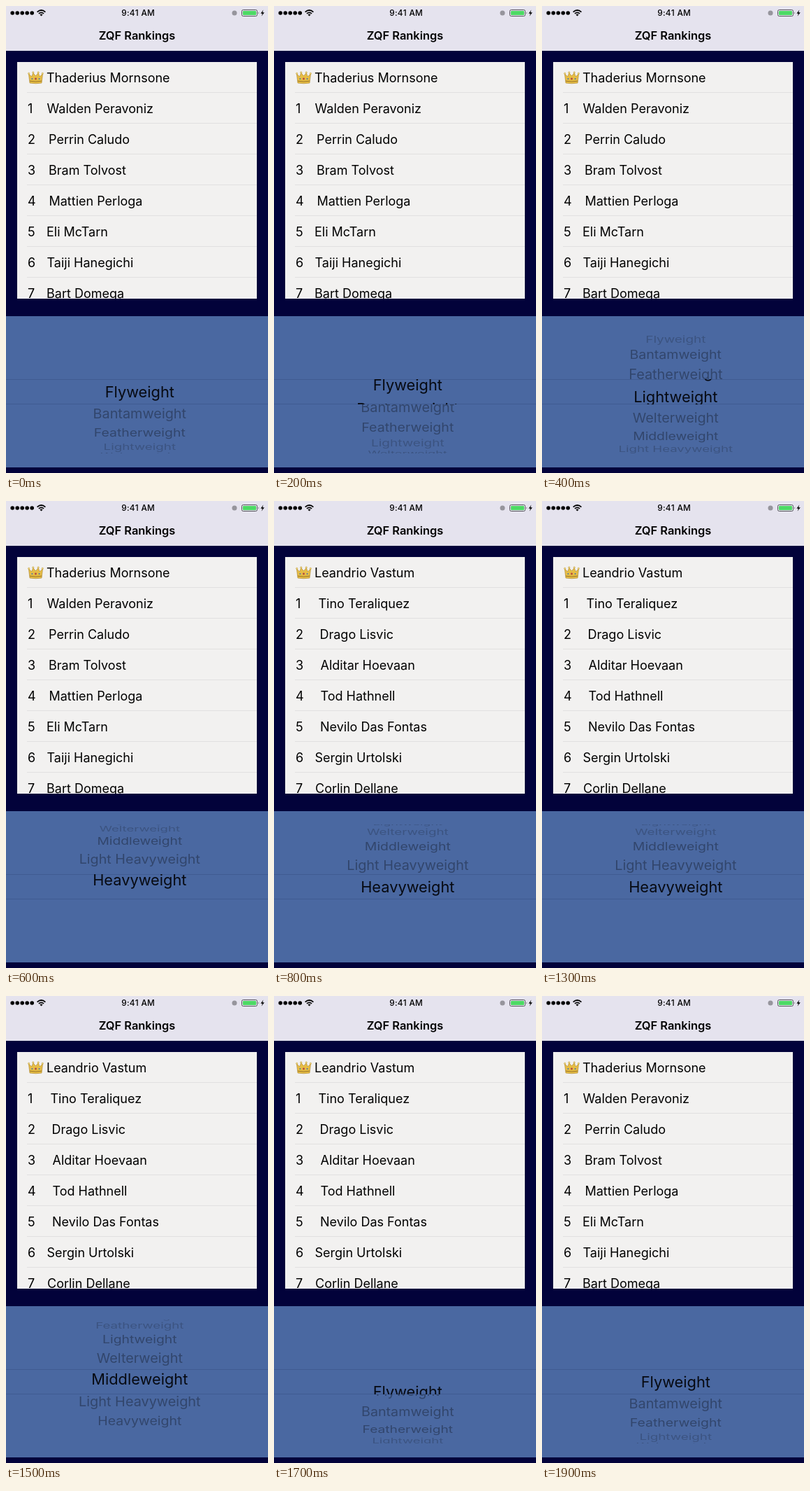
Animation, 375 px wide and 667 px high, one loop 2 s. Source, as an HTML page:

```html
<!DOCTYPE html>
<html lang="en">
<head>
<meta charset="utf-8">
<title>Rankings</title>
<style>
  html, body { margin: 0; width: 100%; height: 100%; overflow: hidden; background: #02023a; }
  svg { display: block; width: 375px; height: 667px; font-family: Inter, "Liberation Sans", sans-serif; }
  .title { font-size: 16.4px; font-weight: 600; }
  .time { font-size: 11.8px; font-weight: 500; letter-spacing: .35px; }
  .list { font-size: 18px; }
  .wheel { text-anchor: middle; }
  .outer { font-size: 20px; }
  .band { font-size: 21.8px; fill: #070a12; }
</style>
</head>
<body>
<svg viewBox="0 0 375 667">
  <defs>
    <clipPath id="panelClip"><path d="M16 80H359V418H16z"/></clipPath>
    <clipPath id="outerClip"><path d="M0 462H375V533H0zM0 569H375V639H0z"/></clipPath>
    <clipPath id="bandClip"><path d="M0 533H375V569H0z"/></clipPath>
  </defs>
  <rect width="375" height="667" fill="#02023a"/>

  <rect width="375" height="64" fill="#e5e3ee"/>
  <g id="signal"></g>
  <g fill="none" stroke="#000" stroke-width="1.7">
    <path d="M44.6 8.6Q50.5 3.4 56.4 8.6M46.9 10.9Q50.5 7.8 54.1 10.9"/>
    <path d="M48.4 12.3Q50.5 10.6 52.6 12.3L50.5 14.5z" fill="#000" stroke="none"/>
  </g>
  <text class="time" x="189.2" y="14.4" text-anchor="middle">9:41 AM</text>
  <circle cx="327" cy="10" r="3.5" fill="#96959c"/>
  <rect x="337.5" y="5.5" width="22" height="9" rx="2" fill="none" stroke="#55545a"/>
  <rect x="339" y="7" width="19" height="6" rx=".8" fill="#4cd964"/>
  <path d="M361 8.3q1.6 1.7 0 3.4z" fill="#55545a"/>
  <path d="M368.3 5.5L364.5 10.7H367L365.7 14.6L369.8 9.2H367.2z"/>
  <text class="title" x="187.5" y="48" text-anchor="middle">ZQF Rankings</text>

  <rect x="16" y="80" width="343" height="338" fill="#f2f1f0"/>
  <g clip-path="url(#panelClip)">
    <g id="rules" stroke="#e1e0e0"></g>
    <g>
      <path d="M34 110L32.4 96.5L36.6 101L38.8 95.5L42.5 100L46.2 95.5L48.4 101L52.6 96.5L51 110Q42.5 111.5 34 110z" fill="#e6bd45" stroke="#a8812c" stroke-width=".6"/>
      <path d="M34 107.2Q42.5 108.8 51 107.2" fill="none" stroke="#8f6a22" stroke-width=".9"/>
      <g fill="#f5dc7c" stroke="#a8812c" stroke-width=".4">
        <circle cx="32.7" cy="96.4" r="1.2"/><circle cx="38.8" cy="95" r="1.2"/>
        <circle cx="46.2" cy="95" r="1.2"/><circle cx="52.3" cy="96.4" r="1.2"/>
      </g>
      <circle cx="42.5" cy="104" r="1.4" fill="#b5443c"/>
      <circle cx="37.4" cy="104" r="1.1" fill="#4f79a8"/><circle cx="47.6" cy="104" r="1.1" fill="#4f79a8"/>
    </g>
    <g id="ranks" class="list"></g>
    <g id="flyList" class="list"></g>
    <g id="heavyList" class="list"></g>
  </g>

  <rect y="443" width="375" height="216" fill="#4a68a1"/>
  <path d="M0 533.5H375M0 568.5H375" stroke="#405b91"/>
  <g clip-path="url(#outerClip)"><g id="outer" class="wheel outer"></g></g>
  <g clip-path="url(#bandClip)"><g id="band" class="wheel band"></g></g>
</svg>
<script>
const $ = id => document.getElementById(id);
const add = (parent, tag, attrs, text = '') => {
  const el = document.createElementNS('http://www.w3.org/2000/svg', tag);
  for (const key in attrs) el.setAttribute(key, attrs[key]);
  el.textContent = text;
  parent.appendChild(el);
  return el;
};

const classes = ['Flyweight', 'Bantamweight', 'Featherweight', 'Lightweight',
  'Welterweight', 'Middleweight', 'Light Heavyweight', 'Heavyweight'];
const flyweights = [['Thaderius Mornsone', 58], ['Walden Peravoniz', 58.5], ['Perrin Caludo', 61],
  ['Bram Tolvost', 61], ['Mattien Perloga', 61.5], ['Eli McTarn', 58], ['Taiji Hanegichi', 58.5], ['Bart Domega', 58]];
const heavyweights = [['Leandrio Vastum', 58], ['Tino Teraliquez', 63.5], ['Drago Lisvic', 65.5],
  ['Alditar Hoevaan', 66.5], ['Tod Hathnell', 66.5], ['Nevilo Das Fontas', 66], ['Sergin Urtolski', 58.5], ['Corlin Dellane', 59]];

const rowY = i => 108.5 + 44 * i;
const fillList = (group, names) =>
  names.forEach(([name, x], i) => add(group, 'text', { x, y: rowY(i) }, name));

for (let i = 0; i < 5; i++) add($('signal'), 'circle', { cx: 9.2 + 7 * i, cy: 10, r: 2.8 });
for (let i = 0; i < 7; i++) {
  add($('rules'), 'path', { d: `M30 ${123.5 + 44 * i}H359` });
  add($('ranks'), 'text', { x: 31, y: rowY(i + 1) }, i + 1);
}
fillList($('flyList'), flyweights);
fillList($('heavyList'), heavyweights);

// Picker drum: rows sit on a cylinder seen in perspective.
const RADIUS = 109.5, ROW_ANGLE = 16.6 * Math.PI / 180, DEPTH = 600;
const CENTER_X = 191.3, CENTER_Y = 551, MAGNIFY = 1.09;
const makeRows = group => classes.map(name => add(group, 'text', { dy: '.364em' }, name));
const outerRows = makeRows($('outer')), bandRows = makeRows($('band'));

function place(row, offset, magnify) {
  const angle = offset * ROW_ANGLE;
  const visible = Math.abs(angle) < 1.45;
  row.style.display = visible ? '' : 'none';
  if (!visible) return;
  const scale = DEPTH / (DEPTH + RADIUS * (1 - Math.cos(angle)));
  const y = CENTER_Y + RADIUS * Math.sin(angle) * scale * magnify;
  row.setAttribute('transform',
    `translate(${CENTER_X} ${y}) scale(${scale} ${scale * Math.cos(angle)})`);
  if (magnify === 1) row.setAttribute('fill-opacity', Math.abs(offset) < 2.5 ? .33 : .2);
}

// Drum position, in rows, for each 100 ms step; both flicks overshoot and settle.
const flickUp = [0, .03, .3, 1.2, 2.8, 5.6, 7.3, 7.03];
const flickDown = [7, 6.5, 5.1, 2, -.4, -.06];
const positionAt = step =>
  step < 8 ? flickUp[step] : step < 13 ? 7 : step < 19 ? flickDown[step - 13] : 0;

function draw() {
  const step = Math.floor(performance.now() % 2000 / 100);
  const position = positionAt(step);
  classes.forEach((_, i) => {
    place(outerRows[i], i - position, 1);
    place(bandRows[i], i - position, MAGNIFY);
  });
  const heavy = step >= 7 && step < 19;
  $('heavyList').style.display = heavy ? '' : 'none';
  $('flyList').style.display = heavy ? 'none' : '';
  requestAnimationFrame(draw);
}
draw();
</script>
</body>
</html>
```
